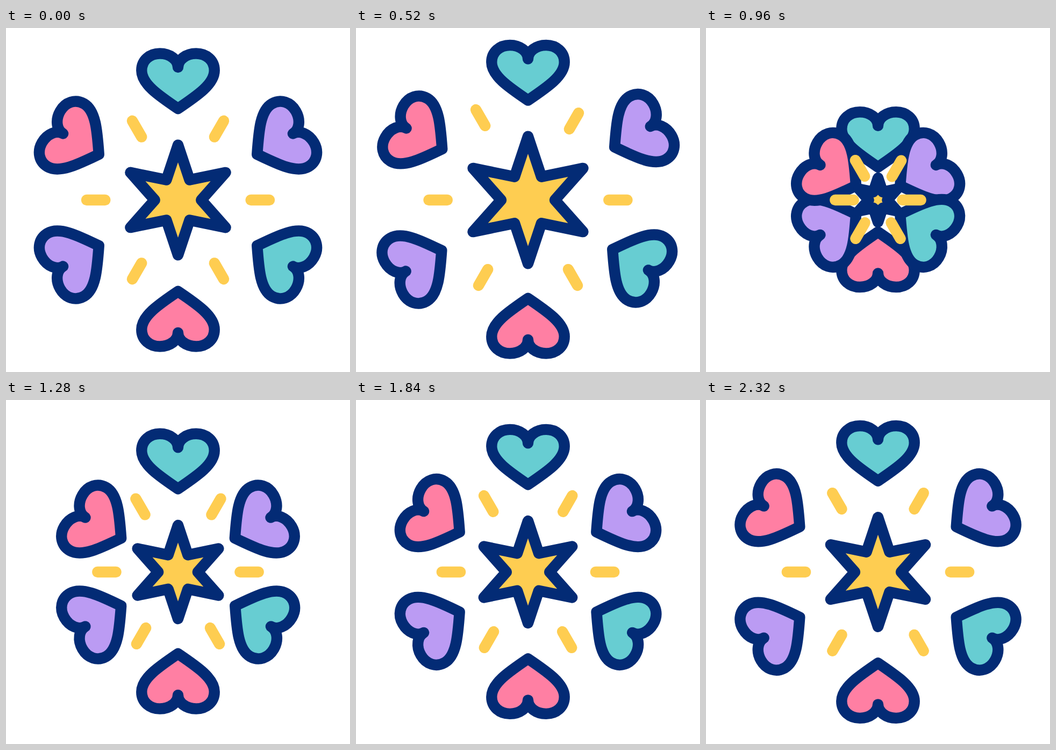
Recreate the animation shown at these times as an HTML page. Size 640 by 640 pixels, loop 2360 ms.

```html
<!DOCTYPE html>
<html lang="en">
<head>
<meta charset="utf-8">
<title>Heart burst</title>
<style>
  html, body { margin: 0; width: 100%; height: 100%; overflow: hidden; background: #fff; }
  svg { display: block; width: 100vw; height: 100vh; }
</style>
</head>
<body>
<svg id="stage" viewBox="0 0 640 640" stroke-width="20.4" stroke-linecap="round" stroke-linejoin="round"></svg>
<script>
const NAVY = '#032b75', GOLD = '#fecd51', TEAL = '#67cdd2', PINK = '#ff7fa3', LILAC = '#bb9bf3';
const LOOP = 2360, STEP = 40, MID = 320, DASH_R = 152.8;
const TIMES = [0, 560, 760, 960, 1160, LOOP];
const HEART = 'M320 73C320 59 305 47.5 286.2 47.5S252.3 60 252.3 79C252.3 104 283 125 320 150' +
  'C357 125 387.7 104 387.7 79C387.7 60 372.6 47.5 353.8 47.5S320 59 320 73Z';

// Shifts from the rest pose at the four inner key times, back to front
const hearts = [
  { turn: 180, fill: PINK,  x: [0, 0, 0, 0],              y: [14, 71, -110.5, -20] },
  { turn: 0,   fill: TEAL,  x: [0, 0, 0, 0],              y: [-16.7, -74.5, 108.7, 17] },
  { turn: 240, fill: LILAC, x: [-14.5, -89, 106.3, 46],   y: [9.7, 55.5, -58.6, -24.5] },
  { turn: 300, fill: PINK,  x: [-13.5, -87, 106.3, 46],   y: [-10.8, -59.5, 58.4, 24.5] },
  { turn: 60,  fill: LILAC, x: [15, 91, -106, -46],       y: [-14.5, -62, 58.4, 24.5] },
  { turn: 120, fill: TEAL,  x: [10.8, 85.5, -106, -45.5], y: [7.5, 56, -58.6, -24.5] }
];

// Dash positions relative to the centre at the same times
const dashes = [
  { turn: 0,   x: [168.5, 246.5, 62.5, 130.3],     y: [0, 0, 0, 0] },
  { turn: 60,  x: [84, 136, 33, 67.6],             y: [145, 222.5, 57, 117.5] },
  { turn: 120, x: [-84, -136, -33, -67.6],         y: [145, 222.5, 57, 117.5] },
  { turn: 180, x: [-168.5, -243.5, -62.5, -130.3], y: [0, 0, 0, 0] },
  { turn: 240, x: [-89.3, -141.2, -33.5, -69.3],   y: [-154.6, -234.7, -59, -120.3] },
  { turn: 300, x: [86.2, 141.8, 34.5, 70.3],       y: [-148, -231, -58.5, -120.3] }
];
const starSize = [119.5, 232, 41, 85.3];

const stage = document.getElementById('stage');

function add(tag, attrs) {
  const el = document.createElementNS('http://www.w3.org/2000/svg', tag);
  for (const key in attrs) el.setAttribute(key, attrs[key]);
  return stage.appendChild(el);
}

// Linear path through rest, the inner keys and rest again
function at(t, rest, keys) {
  const all = [rest, ...keys, rest];
  let i = 0;
  while (i < TIMES.length - 2 && t >= TIMES[i + 1]) i++;
  const p = (t - TIMES[i]) / (TIMES[i + 1] - TIMES[i]);
  return all[i] + (all[i + 1] - all[i]) * p;
}

function starPath(size) {
  const points = [];
  for (let i = 0; i < 12; i++) {
    const r = i % 2 ? size * 0.4225 : size;
    const a = i * Math.PI / 6;
    points.push((MID + r * Math.sin(a)).toFixed(2) + ' ' + (MID - r * Math.cos(a)).toFixed(2));
  }
  return 'M' + points.join('L') + 'Z';
}

for (const h of hearts) h.el = add('path', { d: HEART, fill: h.fill, stroke: NAVY });
const star = add('path', { fill: GOLD, stroke: NAVY });
for (const d of dashes) d.el = add('path', { d: 'M-17.2 0H17.2', fill: 'none', stroke: GOLD });

function draw(t) {
  for (const h of hearts) {
    const x = at(t, 0, h.x), y = at(t, 0, h.y);
    h.el.setAttribute('transform', `translate(${x} ${y}) rotate(${h.turn} ${MID} ${MID})`);
  }
  star.setAttribute('d', starPath(at(t, 102.3, starSize)));
  for (const d of dashes) {
    const a = d.turn * Math.PI / 180;
    const x = MID + at(t, DASH_R * Math.cos(a), d.x);
    const y = MID + at(t, DASH_R * Math.sin(a), d.y);
    d.el.setAttribute('transform', `translate(${x} ${y}) rotate(${d.turn})`);
  }
}

const start = performance.now();
function tick() {
  const t = (performance.now() - start) % LOOP;
  draw(Math.floor(t / STEP) * STEP);
  requestAnimationFrame(tick);
}
draw(0);
requestAnimationFrame(tick);
</script>
</body>
</html>
```
